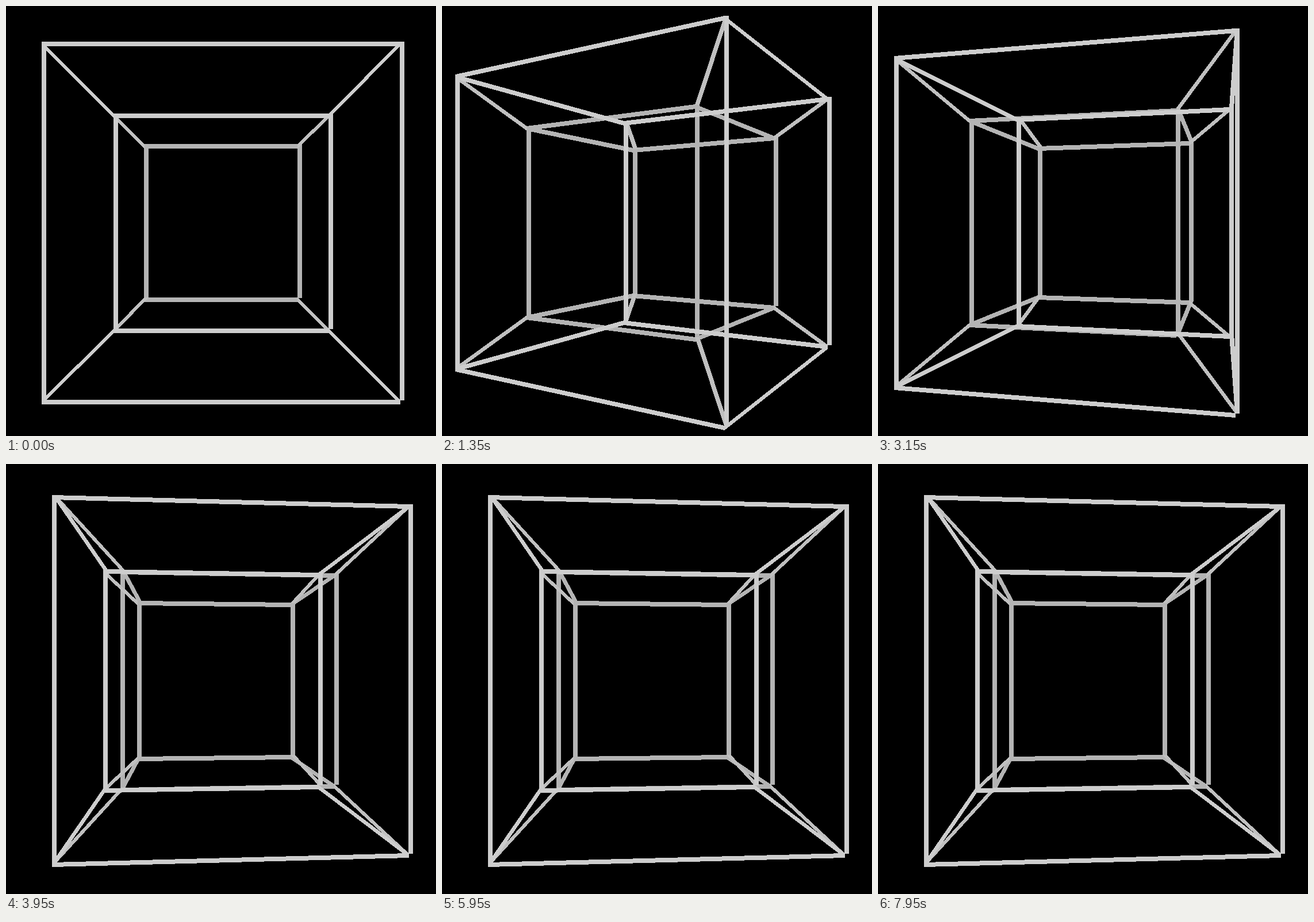
Recreate the animation shown at these times as an HTML page with a canvas. Size 748 by 748 pixels, loop 8000 ms.

```html
<!DOCTYPE html>
<html lang="en">
<head>
<meta charset="utf-8">
<title>Rotating tesseract</title>
<style>
html, body { margin: 0; width: 100%; height: 100%; overflow: hidden; background: #000; }
canvas { display: block; }
</style>
</head>
<body>
<canvas width="748" height="748"></canvas>
<script>
const SIZE = 748, PEN = 8, STEP_MS = 50, STEPS = 160;
const ctx = document.querySelector('canvas').getContext('2d');

// Corner bits: 1 = x, 2 = y, 4 = z, 8 = w
const edges = [];
for (let a = 0; a < 16; a++)
  for (const bit of [1, 2, 4, 8])
    if (!(a & bit)) edges.push({ a, b: a | bit, shade: bit === 8 ? 1 : a & 8 ? 2 : 0 });
edges.sort((p, q) => p.shade - q.shade);
const shades = ['#b4b4b4', '#c0c0c0', '#cdcdcd'];

function project(corner, angle) {
  const [x, y, z, w] = [1, 2, 4, 8].map(bit => corner & bit ? 1 : -1);
  const c = Math.cos(angle), s = Math.sin(angle);
  const scale = SIZE * 1.25 / (5 - w - (x * s + z * c));
  return [(x * c - z * s) * scale, y * scale].map(v => Math.floor(SIZE / 2 + v));
}

// Stepped line whose thickness grows right or down from its path
function line([x0, y0], [x1, y1]) {
  const dx = x1 - x0, dy = y1 - y0;
  const flat = Math.abs(dx) >= Math.abs(dy);
  const n = Math.max(Math.abs(dx), Math.abs(dy));
  for (let i = 0; i <= n; i++) {
    const t = n ? i / n : 0;
    ctx.fillRect(Math.round(x0 + dx * t), Math.round(y0 + dy * t), flat ? 1 : PEN, flat ? PEN : 1);
  }
}

function draw(step) {
  ctx.fillStyle = '#000';
  ctx.fillRect(0, 0, SIZE, SIZE);
  const angle = step * Math.PI / 40;
  const points = Array.from({ length: 16 }, (_, i) => project(i, angle));
  for (const { a, b, shade } of edges) {
    ctx.fillStyle = shades[shade];
    line(points[a], points[b]);
  }
}

let last = -1;
function tick() {
  const step = Math.floor(performance.now() / STEP_MS) % STEPS;
  if (step !== last) draw(last = step);
  requestAnimationFrame(tick);
}
tick();
</script>
</body>
</html>
```
